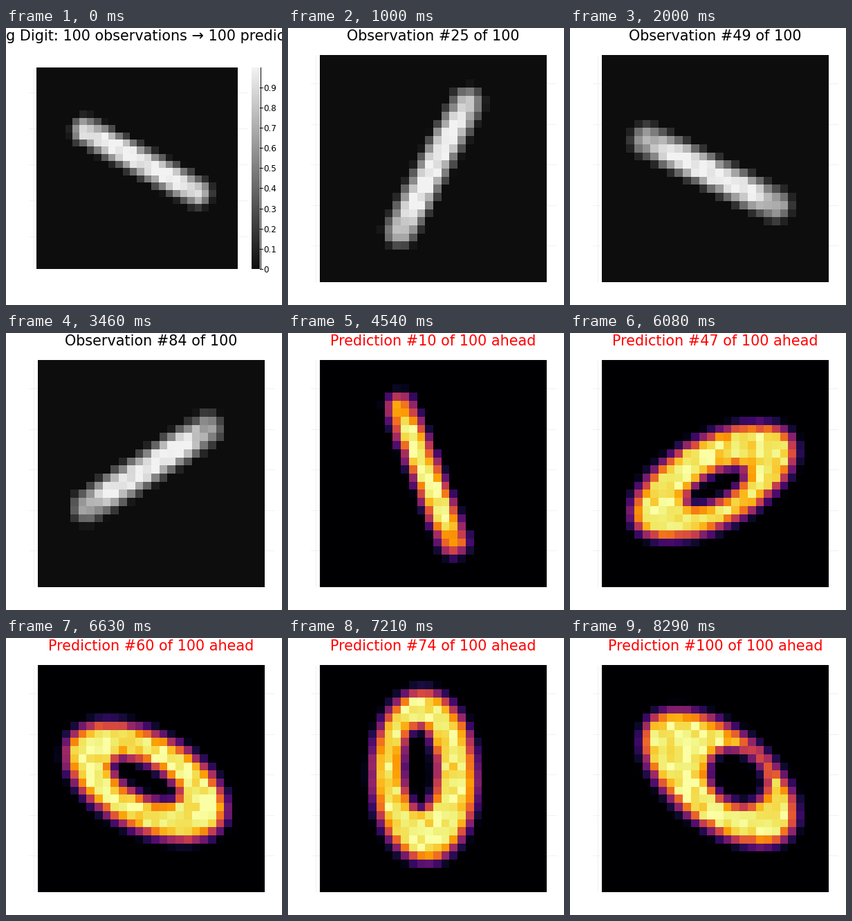
Write a matplotlib script that moves like this. It is 399x400 px and loops after 8.33 s.

```python
import numpy as np
import matplotlib.pyplot as plt
from matplotlib.animation import FuncAnimation
from matplotlib.collections import LineCollection
from matplotlib.colors import LinearSegmentedColormap

W, H, DPI = 399, 400, 64
N, HALF, LOOP = 200, 100, 8330
CELLS = 28

GRAYS = LinearSegmentedColormap.from_list("grays", ["#0d0d0d", "#f2f2f2"])
INFERNO = plt.get_cmap("inferno")

# time, angle (degrees, clockwise)
TURN = np.array([(0, 28.9), (48, 206.6), (83, 327), (109, 428.3),
                 (146, 512), (173, 628), (199, 758)]).T
# time, centre x, centre y, brightness at the tips
STROKE = np.array([(0, 14.6, 13.1, .88), (48, 13.5, 14.5, .72),
                   (83, 13.5, 13.3, .66), (109, 13.2, 14.1, .76),
                   (146, 13.8, 15, .76)]).T
# time, outer centre and radii, hole centre and radii
RING = np.array([(146, 13.8, 15.0, 10.9, 5.3, 14.1, 15.6, 4.1, 1.8),
                 (173, 12.9, 13.7, 10.4, 6.3, 12.3, 12.7, 5.2, 2.2),
                 (199, 14.5, 13.9, 11.0, 5.8, 16.7, 13.8, 4.0, 3.2)]).T

mid = np.arange(CELLS) + 0.5
X, Y = np.meshgrid(mid, mid)
rng = np.random.default_rng(4)
GRAIN = rng.normal(0, 0.045, (2, CELLS, CELLS))


def keyed(table, t):
    return [np.interp(t, table[0], row) for row in table[1:]]


def smooth(x):
    x = np.clip(x, 0, 1)
    return x * x * (3 - 2 * x)


def local(cx, cy, angle):
    c, s = np.cos(angle), np.sin(angle)
    dx, dy = X - cx, Y - cy
    return dx * c + dy * s, dy * c - dx * s


def ellipse(cx, cy, a, b, angle, soft):
    u, v = local(cx, cy, angle)
    q = np.hypot(u / a, v / b) + 1e-6
    slope = np.hypot(u / a**2, v / b**2) + 1e-6
    return smooth(0.5 + (1 - q) * q / slope / soft)


def stroke(t, angle):
    cx, cy, tip = keyed(STROKE, t)
    u, v = local(cx, cy, angle)
    d = np.hypot(np.maximum(abs(u) - 8.9, 0), v)
    fade = 1 - (1 - tip) * smooth((abs(u) - 5.5) / 3)
    return np.clip(0.5 + (1.62 - d) / 1.8, 0, 1) * fade


def ring(t, angle):
    p = keyed(RING, t)
    body = ellipse(*p[:4], angle, 2.9)
    hole = ellipse(*p[4:], angle, 2.6)
    return 0.95 * body * (1 - hole)


def digit(t):
    angle = np.radians(np.interp(t, *TURN))
    m = smooth((t - 118) / 20)
    img = (1 - m) * stroke(t, angle) + m * ring(t, angle)
    w = t * 0.25
    grain = GRAIN[0] * np.cos(w) + GRAIN[1] * np.sin(w)
    return np.clip(img * (1 + grain), 0, 1)


fig = plt.figure(figsize=(W / DPI, H / DPI), dpi=DPI, facecolor="white")
ax = fig.add_axes([0, 0, 1, 1])


def px(size):
    return size * 72 / DPI


heat = ax.imshow(digit(0), cmap=GRAYS, vmin=0, vmax=1, aspect="auto",
                 interpolation="nearest", zorder=2)
grid = LineCollection([], colors="#f1f1f1", linewidths=px(1), zorder=1)
ax.add_collection(grid)
title = ax.text(210, 18, "", fontsize=px(20.7), family="DejaVu Sans",
                ha="center", va="baseline")

# Colour bar, shown with the opening title only
bar = [ax.imshow(np.linspace(1, 0, 256)[:, None], cmap=GRAYS, aspect="auto",
                 extent=(355, 367, 348, 57), zorder=2)]
bar += ax.plot([367.5, 367.5], [57, 348], color="black", lw=px(1), zorder=3)
for k in range(10):
    y = 348 - 29.15 * k
    bar += ax.plot([367, 371], [y, y], color="black", lw=px(1), zorder=3)
    bar.append(ax.text(372, y, f"{k / 10:g}", fontsize=px(11.9),
                       family="DejaVu Sans", va="center_baseline"))

ax.set_xlim(0, W)
ax.set_ylim(H, 0)
ax.axis("off")


def place(x0, y0, size):
    step = size / CELLS
    x1, y1 = x0 + size, y0 + size
    heat.set_extent((x0, x1, y1, y0))
    lines = [[(33, y1 - step * (v - 0.5)), (x1 + 13.5, y1 - step * (v - 0.5))]
             for v in range(5, 30, 5)]
    lines.append([(x0 - step / 2, y0), (x0 - step / 2, y1)])
    grid.set_segments(lines)
    title.set_x(x0 + size / 2)


def draw(i):
    first, ahead = i == 0, i >= HALF
    if first:
        place(44, 57, 291)
        title.set_text("Rotating Digit: 100 observations → 100 predictions")
    else:
        place(46, 39, 328)
        title.set_text(f"Prediction #{i - HALF + 1} of 100 ahead" if ahead
                       else f"Observation #{i + 1} of 100")
    title.set_color("red" if ahead else "black")
    for part in bar:
        part.set_visible(first)
    heat.set_cmap(INFERNO if ahead else GRAYS)
    heat.set_data(digit(i))
    return [heat, grid, title, *bar]


anim = FuncAnimation(fig, draw, frames=N, interval=LOOP / N,
                     repeat=True, repeat_delay=0, blit=False)
plt.show()
```
